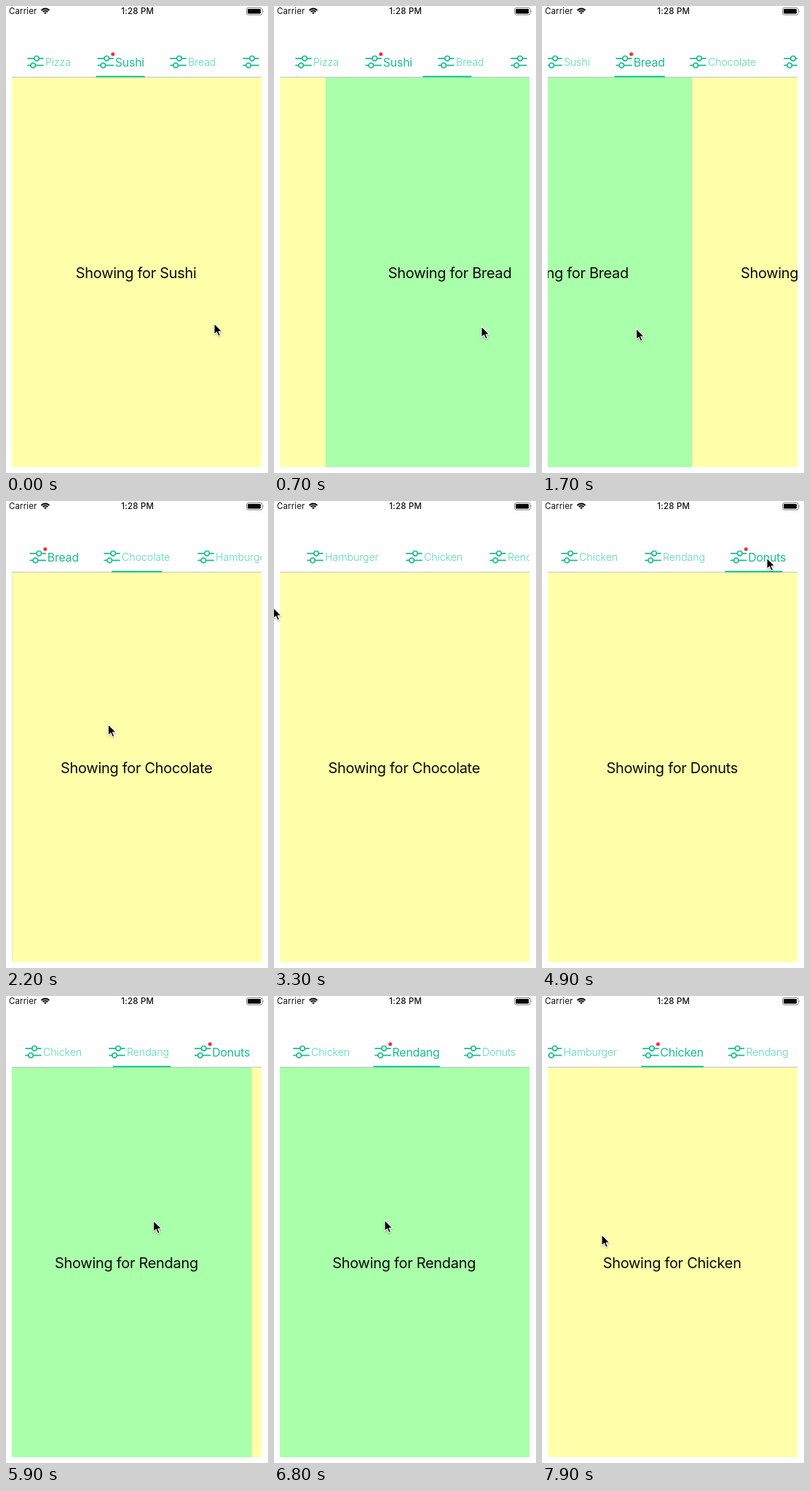
Recreate the animation shown at these times as an HTML page. Size 360 by 640 pixels, loop 8 s.

```html
<!DOCTYPE html>
<html lang="en">
<head>
<meta charset="utf-8">
<title>Food tabs</title>
<style>
  html, body { margin: 0; width: 100%; height: 100%; overflow: hidden; background: #fefeff; }
  svg { display: block; width: 360px; height: 640px; }
  text { font-family: Inter, "Liberation Sans", sans-serif; }
  .status { font-size: 11.5px; letter-spacing: .12px; fill: #111; }
  .clock { font-weight: 500; letter-spacing: .2px; text-anchor: middle; }
  .label { font-size: 14.3px; font-weight: 300; letter-spacing: -.15px; fill: #5bd9b1; }
  .picked .label { font-size: 15.9px; font-weight: 400; letter-spacing: -.2px; fill: #19bd8c; }
  .icon { fill: none; stroke: #18be8e; stroke-width: 1.7; stroke-linecap: round; }
  .badge { fill: #fb2c36; visibility: hidden; }
  .picked .badge { visibility: visible; }
  .title { font-size: 20px; letter-spacing: -.31px; text-anchor: middle; fill: #0a0a0a; }
</style>
</head>
<body>
<svg viewBox="0 0 360 640">
  <defs>
    <clipPath id="inset"><rect x="8" y="0" width="343" height="632"/></clipPath>
  </defs>

  <text class="status" x="4" y="11.4">Carrier</text>
  <g id="wifi" fill="none" stroke="#111" stroke-width="2.1"></g>
  <text class="status clock" x="180.8" y="11.4">1:28 PM</text>
  <rect x="330.5" y="2.5" width="21.5" height="9.6" rx="2.4" fill="none" stroke="#777" stroke-width=".9"/>
  <rect x="332" y="4" width="18" height="6.6" rx="1.1" fill="#080808"/>
  <path d="M353.2 5.6q1.6 1.7 0 3.4z" fill="#777"/>

  <g clip-path="url(#inset)">
    <g id="pages"></g>
    <rect x="8" y="97" width="343" height="1" fill="#c4c4c8"/>
    <g id="bar"><rect id="line" y="95.7" height="2.1" fill="#18c592"/></g>
  </g>

  <path id="cursor" d="M0 0V15.2L3.6 11.9L6 17.4L8.5 16.3L6.2 11H11Z"
        fill="#000" stroke="#fff" stroke-width="1.1" stroke-linejoin="round"
        style="filter: drop-shadow(0 1px 1px rgba(0,0,0,.3))"/>
</svg>

<script>
const LOOP = 8000, LEFT = 8, WIDTH = 343, CENTRE = LEFT + WIDTH / 2;
const HOLD = 380, SETTLE = 450, DRAG = .53;   // a swipe: time held, time to settle, share dragged
const FIRST = 29, GAP = 37, ICON = 25, GROW = 1.11;

const mix = (a, b, u) => a + (b - a) * u;
const clamp = (v, lo, hi) => Math.min(hi, Math.max(lo, v));
const part = (t, start, time) => time ? clamp((t - start) / time, 0, 1) : 1;
const easeOut = (u, power) => 1 - (1 - u) ** power;
const smooth = u => u * u * (3 - 2 * u);
const byId = id => document.getElementById(id);

let end = FIRST;
const tabs = Object.entries({
  Pizza: 61, Sushi: 61, Bread: 63, Chocolate: 92, Hamburger: 99, Chicken: 78, Rendang: 83, Donuts: 72
}).map(([name, width]) => {
  const mid = end + width / 2;
  end += width + GAP;
  return { name, width, mid, wide: ICON - .5 + (width - ICON) * GROW };
});
const maxBar = end - GAP - 333;
const centred = tab => clamp(tab.mid - CENTRE, 0, maxBar);

// Every gesture begins with the cursor at x, y
const rest = (at, x, y) => ({ at, x, y, hold: 0 });
const pan = (at, x, y, by) => ({ at, x, y, by, hold: HOLD });
const tap = (at, x, y, to) => ({ at, x, y, to, hold: 0, share: 0, settle: 280, pick: 0 });
const swipe = (at, x, y, to, lead = "line") =>
  ({ at, x, y, to, lead, hold: HOLD, share: DRAG, settle: SETTLE, pick: HOLD + SETTLE });

const gestures = [
  swipe(152, 286, 435, 2),
  rest(690, 285, 439),
  swipe(1399, 274, 442, 3, "bar"),
  pan(2800, 222, 76, 217.5),
  rest(3300, -1, 146),
  pan(3850, 240, 76, 155),
  tap(4600, 309, 78, 7),
  rest(4950, 309, 78),
  swipe(5200, 125, 310, 6),
  rest(6100, 152, 307),
  swipe(6850, 152, 307, 5),
  rest(7650, 82, 327)
];

function pageProgress(g, t) {
  const release = g.at + g.hold;
  return t < release
    ? g.share * part(t, g.at, g.hold)
    : mix(g.share, 1, easeOut(part(t, release, g.settle), 2));
}

// Plays all gestures up to time t
function stateAt(t) {
  const s = { from: 1, to: 1, progress: 1, picked: 1, line: tabs[1].mid, bar: 0, x: 286, y: 435 };
  let free = 0;
  for (const g of gestures) {
    if (t < g.at) {
      const u = smooth(part(t, free, g.at - free));
      s.x = mix(s.x, g.x, u);
      s.y = mix(s.y, g.y, u);
      break;
    }
    const grip = part(t, g.at, g.hold);
    let pull = 0;
    if (g.by) {
      pull = g.by;
      s.bar = clamp(s.bar + pull * grip, 0, maxBar);
    } else if (g.to) {
      const goal = tabs[g.to], release = g.at + g.hold;
      s.from = s.to;
      s.to = g.to;
      s.progress = pageProgress(g, t);
      pull = Math.sign(s.to - s.from) * g.share * WIDTH;
      // One of line and bar moves with the page, the other catches up
      s.line = mix(s.line, goal.mid,
        g.lead === "line" ? s.progress : easeOut(part(t, release, 390), 3));
      s.bar = mix(s.bar, centred(goal),
        g.lead === "bar" ? pageProgress(g, t - 20) : easeOut(part(t, release + g.settle, 220), 3));
      if (t >= g.at + g.pick) s.picked = g.to;
    }
    s.x = g.x - pull * grip;
    s.y = g.y;
    free = g.at + g.hold;
  }
  return s;
}

function make(parent, tag, attrs, text) {
  const node = document.createElementNS("http://www.w3.org/2000/svg", tag);
  for (const key in attrs) node.setAttribute(key, attrs[key]);
  if (text) node.textContent = text;
  return parent.appendChild(node);
}

const shift = (node, x, y = 0) => node.setAttribute("transform", `translate(${x} ${y})`);

for (let r = 7.8; r > 1; r -= 3) {
  const d = r * .707;
  make(byId("wifi"), "path", { d: `M${54 - d} ${11.4 - d}A${r} ${r} 0 0 1 ${54 + d} ${11.4 - d}` });
}

tabs.forEach((tab, i) => {
  tab.page = make(byId("pages"), "g", {});
  make(tab.page, "rect", { y: 98, width: WIDTH + .3, height: 534, fill: i % 2 ? "#ffffaa" : "#aaffaa" });
  make(tab.page, "text", { class: "title", x: WIDTH / 2 - .8, y: 372.6 }, "Showing for " + tab.name);

  tab.cell = make(byId("bar"), "g", {});
  const icon = make(tab.cell, "g", { class: "icon" });
  make(icon, "path", { d: "M1 71.8H9.8M16.4 71.8H22M1 81.4H4.9M11.5 81.4H22" });
  make(icon, "circle", { cx: 13.1, cy: 71.8, r: 3.3 });
  make(icon, "circle", { cx: 8.2, cy: 81.4, r: 3.3 });
  tab.label = make(tab.cell, "text", { class: "label" }, tab.name);
  make(tab.cell, "circle", { class: "badge", cx: 21.6, cy: 66, r: 2.5 });
});

function draw(t) {
  const { from, to, progress, picked, line, bar, x, y } = stateAt(t);
  const side = Math.sign(to - from);

  tabs.forEach((tab, i) => {
    // A picked tab loses its style once its middle has scrolled out
    const on = i === picked && tab.mid - bar > LEFT;
    tab.cell.setAttribute("class", on ? "picked" : "");
    tab.label.setAttribute("x", on ? 24.5 : 25);
    tab.label.setAttribute("y", on ? 82.5 : 82);
    shift(tab.cell, tab.mid - (on ? tab.wide : tab.width) / 2);

    tab.page.style.display = i === from || i === to ? "" : "none";
    const place = i === to ? side * (1 - progress) : -side * progress;
    shift(tab.page, LEFT + place * WIDTH);
  });

  const width = tabs[picked].wide + 2.5;
  byId("line").setAttribute("x", line - width / 2 - .3);
  byId("line").setAttribute("width", width);
  byId("line").style.display = line - bar > LEFT ? "" : "none";
  shift(byId("bar"), -bar);
  shift(byId("cursor"), x, y);
}

const begin = performance.now();
function tick() {
  draw((performance.now() - begin) % LOOP);
  requestAnimationFrame(tick);
}
tick();
</script>
</body>
</html>
```
